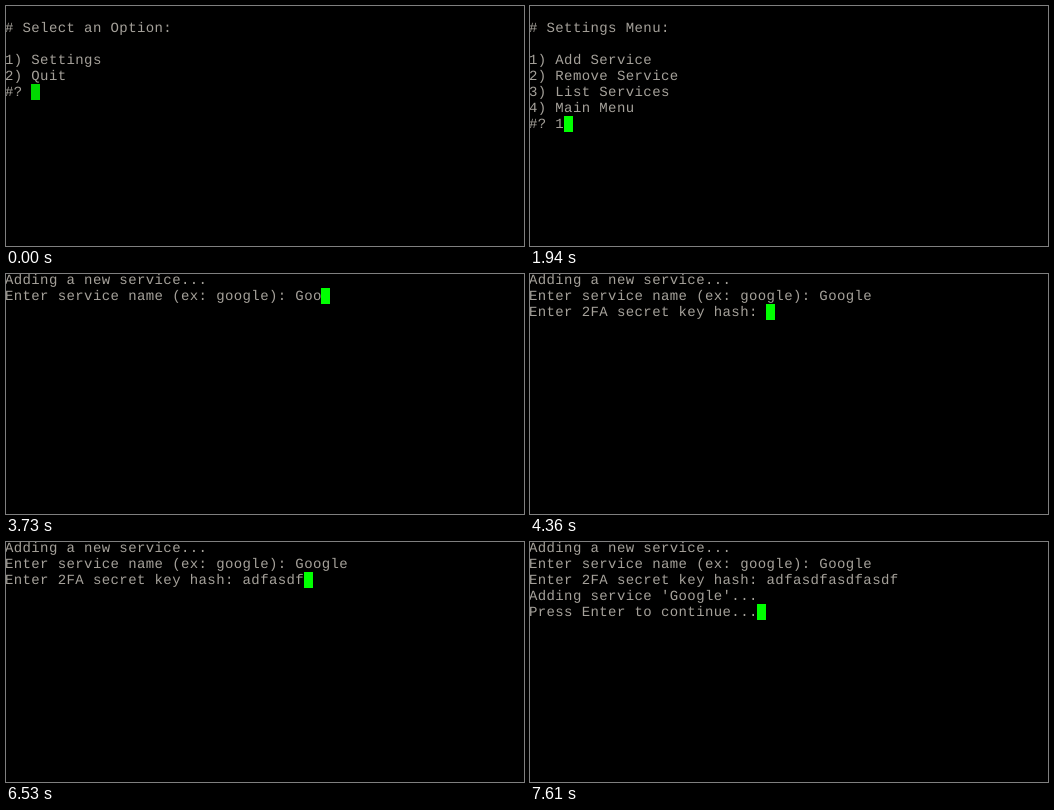
An HTML page for the animation above (8 s loop, 518 by 240 pixels).

```html
<!DOCTYPE html>
<html lang="en">
<head>
<meta charset="utf-8">
<title>Terminal session</title>
<style>
html, body {
  margin: 0;
  width: 100%;
  height: 100%;
  overflow: hidden;
  background: #000;
}
#term {
  position: relative;
  width: 518px;
  height: 240px;
  overflow: hidden;
  background: #000;
}
#text {
  position: absolute;
  left: -1.1px;
  top: -1px;
  margin: 0;
  font: 14px/16px "Liberation Mono", monospace;
  letter-spacing: 0.4px;
  text-rendering: geometricPrecision;
  font-variant-ligatures: none;
  white-space: pre;
  color: #a5a19a;
}
#cursor {
  position: absolute;
  width: 9px;
  height: 16px;
  background: #0f0;
}
</style>
</head>
<body>
<div id="term">
  <pre id="text"></pre>
  <div id="cursor"></div>
</div>
<script>
const LOOP = 8000, CELL = 8.8, ROW = 16, LEFT = -1.1, TOP = -2;
const FIRST_KEY = 940;

const mainMenu = '\n# Select an Option:\n\n1) Settings\n2) Quit\n#? ';
const settingsMenu = '\n# Settings Menu:\n\n1) Add Service\n2) Remove Service\n' +
  '3) List Services\n4) Main Menu\n#? ';
const askName = 'Adding a new service...\nEnter service name (ex: google): ';
const askKey = askName + 'Google\nEnter 2FA secret key hash: ';
const done = askKey + "adfasdfasdfasdf\nAdding service 'Google'...\nPress Enter to continue...";

const burst = (word, start, duration = 1) => ({ word, start, duration });

// Each screen starts with a printed prompt, then takes bursts of typing.
const screens = [
  { start: 0, prompt: mainMenu, bursts: [burst('1', FIRST_KEY)] },
  { start: 1250, prompt: settingsMenu, bursts: [burst('1', 1940)] },
  { start: 2170, prompt: askName, bursts: [burst('Google', 3330, 780)] },
  { start: 4360, prompt: askKey, bursts: [
    burst('adf', 5910, 220), burst('asdf', 6360, 170),
    burst('asdf', 6760, 80), burst('asdf', 7140, 160)
  ] },
  { start: 7610, prompt: done, bursts: [] }
];

// The first letter lands at once; the others follow at a quickening pace.
function typed({ word, start, duration }, t) {
  if (t < start) return '';
  const p = Math.min((t - start) / duration, 1);
  return word.slice(0, 1 + Math.floor((word.length - 1) * p ** 1.25));
}

const text = document.getElementById('text');
const cursor = document.getElementById('cursor');

function draw(t) {
  const { prompt, bursts } = screens.findLast(s => s.start <= t);
  const shown = prompt + bursts.map(b => typed(b, t)).join('');
  const lines = shown.split('\n');
  const row = lines.length - 1;
  if (text.textContent !== shown) text.textContent = shown;
  cursor.style.left = Math.floor(lines[row].length * CELL + LEFT) + 'px';
  cursor.style.top = row * ROW + TOP + 'px';
  cursor.style.background = t < FIRST_KEY ? '#00d900' : '#0f0';
}

const start = performance.now();

function frame() {
  draw((performance.now() - start) % LOOP);
  requestAnimationFrame(frame);
}
frame();
</script>
</body>
</html>
```
